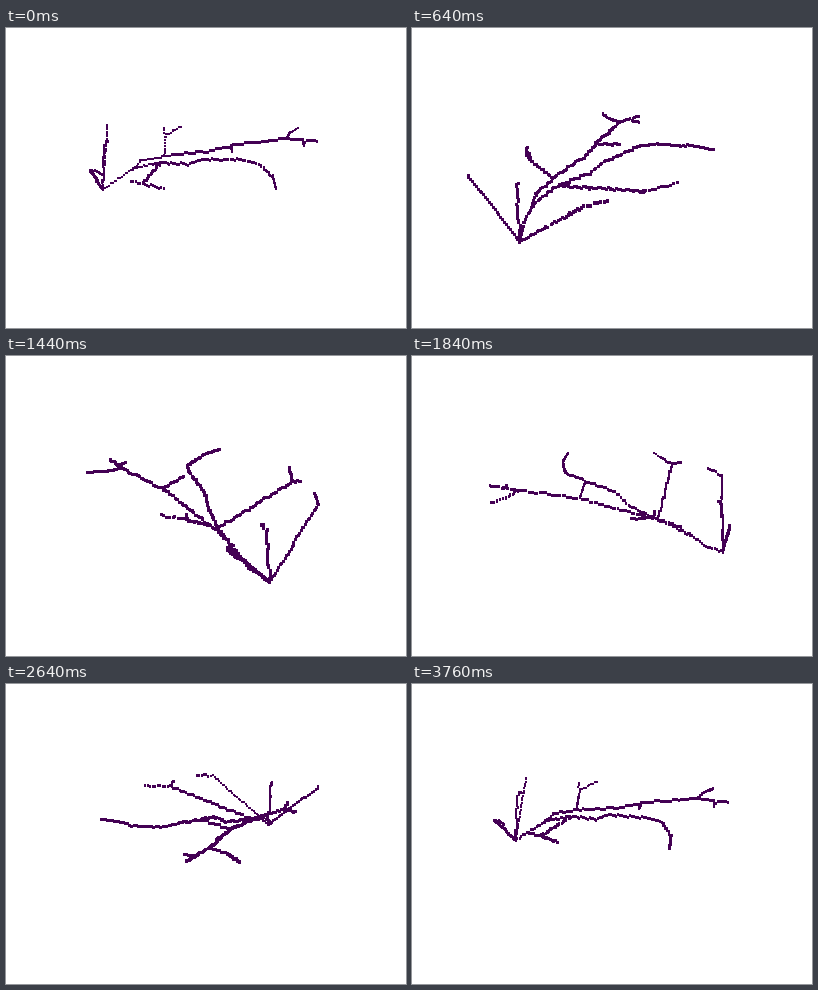
An HTML page with a canvas that plays this animation: 400x300 px, repeating every 3840 ms.

```html
<!DOCTYPE html>
<html lang="en">
<head>
<meta charset="utf-8">
<title>Rotating branch skeleton</title>
<style>
html, body { margin: 0; width: 100%; height: 100%; overflow: hidden; background: #fff; }
canvas { display: block; width: 400px; height: 300px; }
</style>
</head>
<body>
<canvas id="stage" width="400" height="300"></canvas>
<script>
const ctx = document.getElementById('stage').getContext('2d');
const STEP = 80, COUNT = 48, VOXEL = 2;
const CAMERA = 600, TILT = 23.8 * Math.PI / 180;
const cosT = Math.cos(TILT), sinT = Math.sin(TILT);

// Skeleton nodes: right, down, towards the viewer
const nodes = {
  root: [-110, 27.6, -32], t0: [-92, 17, -40], t1: [-79, 7, -41], t2: [-71, -1, -42],
  g0: [-44, -8, -40], g1: [-44, -21, -66], g2: [-28, -26, -83], g3: [-47, -28, -71],
  b0: [-106, -22, -35], b1: [-102, -27, -37],
  c0: [-111, -26.5, -87],
  d0: [-108, -24, 36], d1: [-95, -27, 49],
  e0: [-48, -3, -33], e1: [-56, -23.5, 65], e2: [-36, -27.5, 85], e3: [-66, -26.5, 65],
  f0: [-18, -9, -15], f1: [-4, -17.5, -6], f2: [33, -24, 10], f3: [51, -24.5, 23],
  f4: [60, -25, 52], f5: [59, -26, 82],
  h0: [5, -15.5, -34], h1: [26, -21.5, -35], h2: [26, -26, -6],
  k0: [84, -28, -38], i0: [89, -29, -56], i1: [100, -27.5, -70],
  j0: [101, -27, -33], j1: [113, -28, -31], j2: [100, -27, -22]
};

const branches = [
  'root t0 t1 t2 g0 g1 g2', 'g1 g3',
  'root b0 b1', 'root c0', 'root d0 d1',
  't1 e0 e1 e2', 'e1 e3',
  'e0 f0 f1 f2 f3 f4 f5',
  'g0 h0 h1 k0 j0 j1', 'h1 h2', 'k0 i0 i1', 'j0 j2'
];

const snap = v => Math.round(v / VOXEL) * VOXEL;

// Voxels on the grid along one straight piece
function trace(a, b) {
  const n = Math.ceil(Math.max(...a.map((v, i) => Math.abs(b[i] - v))) / VOXEL);
  return Array.from({ length: n + 1 }, (_, k) =>
    a.map((v, i) => snap(v + (b[i] - v) * k / n)));
}

const voxels = branches.flatMap(text => {
  const path = text.split(' ').map(name => nodes[name]);
  return path.slice(1).flatMap((p, i) => trace(path[i], p));
});

function draw(angle) {
  const c = Math.cos(angle), s = Math.sin(angle);
  // Outline of one turned cube
  const spread = Math.abs(c) + Math.abs(s);
  const wide = VOXEL * spread;
  const high = VOXEL * (cosT + sinT * spread);
  ctx.fillStyle = '#fff';
  ctx.fillRect(0, 0, 400, 300);
  ctx.fillStyle = '#440154';
  for (const [x, y, z] of voxels) {
    const side = x * c + z * s;
    const near = z * c - x * s;
    const zoom = CAMERA / (CAMERA - near * cosT + y * sinT);
    const w = Math.max(2, Math.round(wide * zoom));
    const h = Math.max(2, Math.round(high * zoom));
    const px = 200 + side * zoom;
    const py = 150 + (y * cosT + near * sinT) * zoom;
    ctx.fillRect(Math.round(px - w / 2), Math.round(py - h / 2), w, h);
  }
}

function tick(now) {
  const step = Math.floor(now / STEP) % COUNT;
  draw(step * 2 * Math.PI / COUNT);
  requestAnimationFrame(tick);
}

draw(0);
requestAnimationFrame(tick);
</script>
</body>
</html>
```
